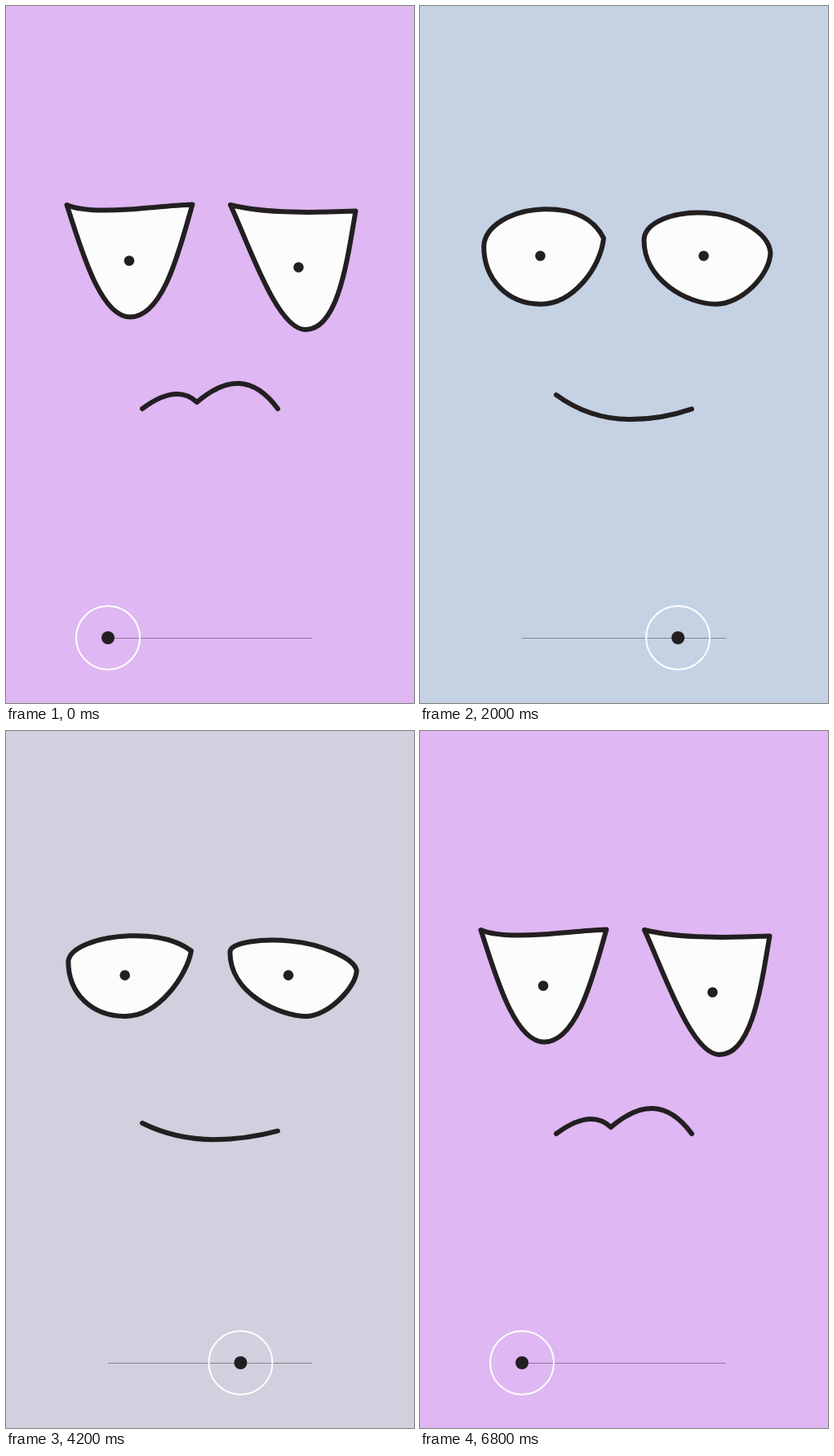
An HTML page for the animation above (6.9 s loop, 500x855 px).

```html
<!DOCTYPE html>
<html lang="en">
<head>
<meta charset="utf-8">
<title>Mood slider</title>
<style>
  html, body { margin: 0; width: 100%; height: 100%; overflow: hidden; }
  svg { display: block; width: 100%; height: 100%; }
  .ink { fill: none; stroke: #231f20; stroke-width: 6; stroke-linecap: round; stroke-linejoin: round; }
  .eye { fill: #fdfcfd; }
  .dot { fill: #231f20; }
</style>
</head>
<body>
<svg viewBox="0 0 500 855">
  <rect id="sky" width="500" height="855"/>
  <path id="leftEye" class="ink eye"/>
  <path id="rightEye" class="ink eye"/>
  <circle id="leftPupil" class="dot" r="6.3"/>
  <circle id="rightPupil" class="dot" r="6.3"/>
  <path id="mouth" class="ink"/>
  <path d="M125 775.5H375" stroke="#231f20" stroke-opacity=".42"/>
  <g id="thumb">
    <circle class="dot" r="8"/>
    <circle r="39" fill="none" stroke="#fff" stroke-width="2"/>
  </g>
</svg>
<script>
const LOOP = 6900, STEP = 100;
const $ = id => document.getElementById(id);

// Every part has three poses: sad, neutral, happy.
const shapes = {
  leftEye: [
    'M74.5,244 C90,251 120,251.5 150,249.5 C178,247.5 204,244.5 228.5,243.5 C214,293 194,381.5 152,381.5 C114,381.5 90,290 74.5,244 Z',
    'M74,266.5 C77,260 110,256.5 150,254 C180,252 205,251.1 229.5,250.6 C222,274 186,330 144.5,330 C103,330 74,306 74,266.5 Z',
    'M82,320 C82,279 113,245 153,245 C196,245 221,270 221,316 C221,362 190,398 151,398 C111,398 82,362 82,320 Z'
  ],
  rightEye: [
    'M275,244 C297,249.5 326,252 350,252.6 C378,253.5 404,252.5 428.5,251.5 C418,313 407,397 367,397 C332,397 297,291 275,244 Z',
    'M274.5,250.5 C275,251 318,257.5 350,263 C378,267.5 425,277.5 430,283 C429,296 393,330 376,330 C347,330 274.5,306 274.5,250.5 Z',
    'M274.5,321 C274.5,278 306,245.5 351,245.5 C397,245.5 429,277 429,320 C429,362 394,398 351,398 C309,398 274.5,362 274.5,321 Z'
  ],
  mouth: [
    'M167,494 C195,473 217,470 234,486 C270,455 303,453 333,494',
    'M167,486 C194,491 222,493.8 250,493.8 C278,493.8 306,491 333,486',
    'M167,469 C195,503 230,519 266,519 C289,519 312,513 333,502'
  ]
};
const pupils = {
  leftPupil: ['151,312.5', '143.5,291', '151,320.5'],
  rightPupil: ['358.5,320.5', '344,291', '351,320.5']
};
const colours = ['222,183,243', '222,207,216', '175,212,238'];

// Slider position as [ms, value]
const track = [[0, 0], [300, 0], [1500, .472], [2600, 1], [2900, 1],
               [4200, .65], [4800, .426], [5700, .192], [6600, 0], [LOOP, 0]];

function slope(i) {
  const a = track[i - 1], b = track[i], c = track[i + 1];
  if (!a || !c || a[1] === b[1] || b[1] === c[1]) return 0;
  return (c[1] - a[1]) / (c[0] - a[0]);
}

function sliderAt(t) {
  const i = track.findIndex((p, k) => k && t < p[0]) - 1;
  const [t0, v0] = track[i], [t1, v1] = track[i + 1];
  const d = t1 - t0, u = (t - t0) / d, w = 1 - u;
  return v0 * (1 + 2 * u) * w * w + v1 * u * u * (3 - 2 * u)
       + d * u * w * (slope(i) * w - slope(i + 1) * u);
}

// Blend the numbers of two strings of the same structure
function mix(from, to, k) {
  const ends = to.match(/[\d.]+/g);
  let n = 0;
  return from.replace(/[\d.]+/g, a => (+a + (ends[n++] - a) * k).toFixed(2));
}

function draw(t) {
  const v = sliderAt(t);
  const low = Math.min(1, v / .485), high = Math.max(0, (v - .505) / .495);
  const pose = ([sad, neutral, happy]) =>
    low < 1 ? mix(sad, neutral, low) : mix(neutral, happy, high);

  for (const id in shapes) $(id).setAttribute('d', pose(shapes[id]));
  for (const id in pupils) $(id).setAttribute('transform', `translate(${pose(pupils[id])})`);
  const rgb = pose(colours).split(',').map(Math.round);
  $('sky').setAttribute('fill', `rgb(${rgb})`);
  $('thumb').setAttribute('transform', `translate(${125 + 250 * v},775)`);
}

const start = performance.now();
function tick() {
  const t = (performance.now() - start) % LOOP;
  draw(Math.floor(t / STEP) * STEP);
  requestAnimationFrame(tick);
}
tick();
</script>
</body>
</html>
```
